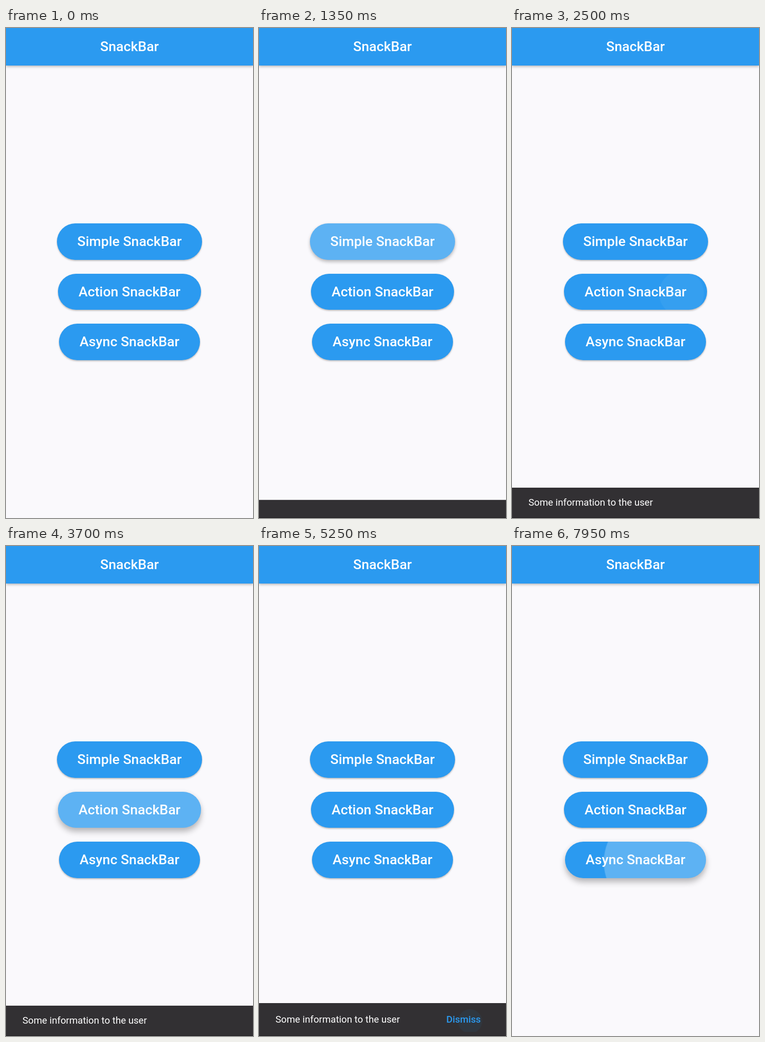
An HTML page that plays this animation: 480x953 px, repeating every 8000 ms.

```html
<!DOCTYPE html>
<html lang="en">
<head>
<meta charset="utf-8">
<title>SnackBar</title>
<style>
:root {
  --blue: #2b9af0;
  --loop: 8s;
  --smooth: cubic-bezier(.4, 0, .2, 1);
  --low: 0 2px 3px rgba(0, 0, 0, .24), 0 0 2px rgba(0, 0, 0, .06);
  --high: 0 8px 12px rgba(0, 0, 0, .25), 0 0 10px rgba(0, 0, 0, .06);
}
html, body { margin: 0; width: 100%; height: 100%; overflow: hidden; }
body {
  position: relative;
  background: #faf9fc;
  color: #fff;
  font: 500 26.67px/1.172 Roboto, sans-serif;
}
header {
  height: 73px;
  line-height: 73px;
  text-align: center;
  background: var(--blue);
  box-shadow: 0 2px 5px rgba(0, 0, 0, .28);
}
main {
  position: absolute;
  top: 380.3px;
  width: 100%;
  display: flex;
  flex-direction: column;
  align-items: center;
  gap: 26.67px;
}
.button {
  position: relative;
  padding: 0 40px;
  line-height: 70.67px;
  border-radius: 36px;
  overflow: hidden;
  background: var(--blue);
  box-shadow: var(--low);
  white-space: nowrap;
  animation: var(--lift) var(--loop) var(--smooth) infinite;
}
.label { position: relative; }

/* Ink circle: grows for one second while drifting to the centre */
.ink {
  position: absolute;
  left: 50%;
  top: 50%;
  width: calc(2 * var(--r));
  height: calc(2 * var(--r));
  margin: calc(-1 * var(--r)) 0 0 calc(-1 * var(--r));
  border-radius: 50%;
  background: var(--tint);
  opacity: 0;
  animation:
    grow var(--loop) calc(var(--at) - var(--loop)) infinite,
    var(--fade) var(--loop) linear infinite;
}
.button .ink { --r: 150px; --tint: rgba(255, 255, 255, .24); }
.simple { --lift: lift1; --fade: fade1; --at: .19s; --dx: 84px; --dy: 8px; }
.action { --lift: lift2; --fade: fade2; --at: 2.485s; --dx: 90px; --dy: 3px; }
.async { --lift: lift3; --fade: fade3; --at: 7.64s; --dx: 83px; --dy: 10px; }

.bars {
  position: absolute;
  inset: 0;
  overflow: hidden;
  visibility: hidden;
  font-size: 18.67px;
  font-weight: 400;
  animation: bars var(--loop) infinite;
}
.bars::after {
  content: "";
  position: absolute;
  bottom: 0;
  width: 100%;
  height: 1px;
  background: #1d1c1e;
}
.bar {
  position: absolute;
  bottom: 0;
  width: 100%;
  height: var(--h);
  line-height: var(--h);
  background: #323033;
  transform: translateY(var(--h));
  animation: var(--slide) var(--loop) infinite;
}
.bar > * { animation: var(--show) var(--loop) var(--smooth) infinite; }
.info { --h: 58.67px; --slide: slide1; --show: show1; }
.choice { --h: 64px; --slide: slide2; --show: show2; }
.text { position: absolute; left: 32px; }
.dismiss {
  position: absolute;
  right: 16px;
  top: 8px;
  width: 133px;
  height: 48px;
  line-height: 48px;
  border-radius: 5px;
  overflow: hidden;
  text-align: center;
  font-weight: 500;
  color: var(--blue);
}
.dismiss .ink {
  --r: 77.5px; --tint: rgba(43, 154, 240, .12);
  --fade: fade4; --at: 5.21s; --dx: 13px; --dy: 3px;
}

@keyframes grow {
  0% { transform: translate(var(--dx), var(--dy)) scale(.287); animation-timing-function: ease; }
  12.5%, 100% { transform: none; }
}
@keyframes fade1 {
  0%, 2.375% { opacity: 0; }
  3.3125%, 18.625% { opacity: 1; }
  20.5%, 100% { opacity: 0; }
}
@keyframes fade2 {
  0%, 31.0625% { opacity: 0; }
  32%, 49.5625% { opacity: 1; }
  51.4375%, 100% { opacity: 0; }
}
@keyframes fade3 {
  0%, 95.5% { opacity: 0; }
  96.4375%, 100% { opacity: 1; }
}
@keyframes fade4 {
  0%, 65.125% { opacity: 0; }
  66.0625%, 100% { opacity: 1; }
}
@keyframes lift1 {
  0%, 2.375%, 18.3125%, 100% { box-shadow: var(--low); }
  4.875%, 15.8125% { box-shadow: var(--high); }
}
@keyframes lift2 {
  0%, 31.0625%, 49.25%, 100% { box-shadow: var(--low); }
  33.5625%, 46.75% { box-shadow: var(--high); }
}
@keyframes lift3 {
  0%, 95.5% { box-shadow: var(--low); }
  98%, 100% { box-shadow: var(--high); }
}
@keyframes bars {
  0%, 15.8125% { visibility: hidden; }
  15.8135%, 83.12% { visibility: visible; }
  83.121%, 100% { visibility: hidden; }
}
@keyframes slide1 {
  0%, 15.8125% { transform: translateY(var(--h)); animation-timing-function: var(--smooth); }
  18.9375%, 47.375% { transform: none; }
  47.376%, 100% { transform: translateY(var(--h)); }
}
@keyframes slide2 {
  0%, 46.75% { transform: translateY(var(--h)); animation-timing-function: var(--smooth); }
  49.875%, 100% { transform: none; }
}
@keyframes show1 {
  0%, 18.0625% { opacity: 0; }
  18.9375%, 100% { opacity: 1; }
}
@keyframes show2 {
  0%, 49% { opacity: 0; }
  49.875%, 100% { opacity: 1; }
}
</style>
</head>
<body>
<header>SnackBar</header>
<main>
  <div class="button simple"><i class="ink"></i><span class="label">Simple SnackBar</span></div>
  <div class="button action"><i class="ink"></i><span class="label">Action SnackBar</span></div>
  <div class="button async"><i class="ink"></i><span class="label">Async SnackBar</span></div>
</main>
<div class="bars">
  <div class="bar info"><span class="text">Some information to the user</span></div>
  <div class="bar choice">
    <span class="text">Some information to the user</span>
    <div class="dismiss"><i class="ink"></i><span class="label">Dismiss</span></div>
  </div>
</div>
</body>
</html>
```
